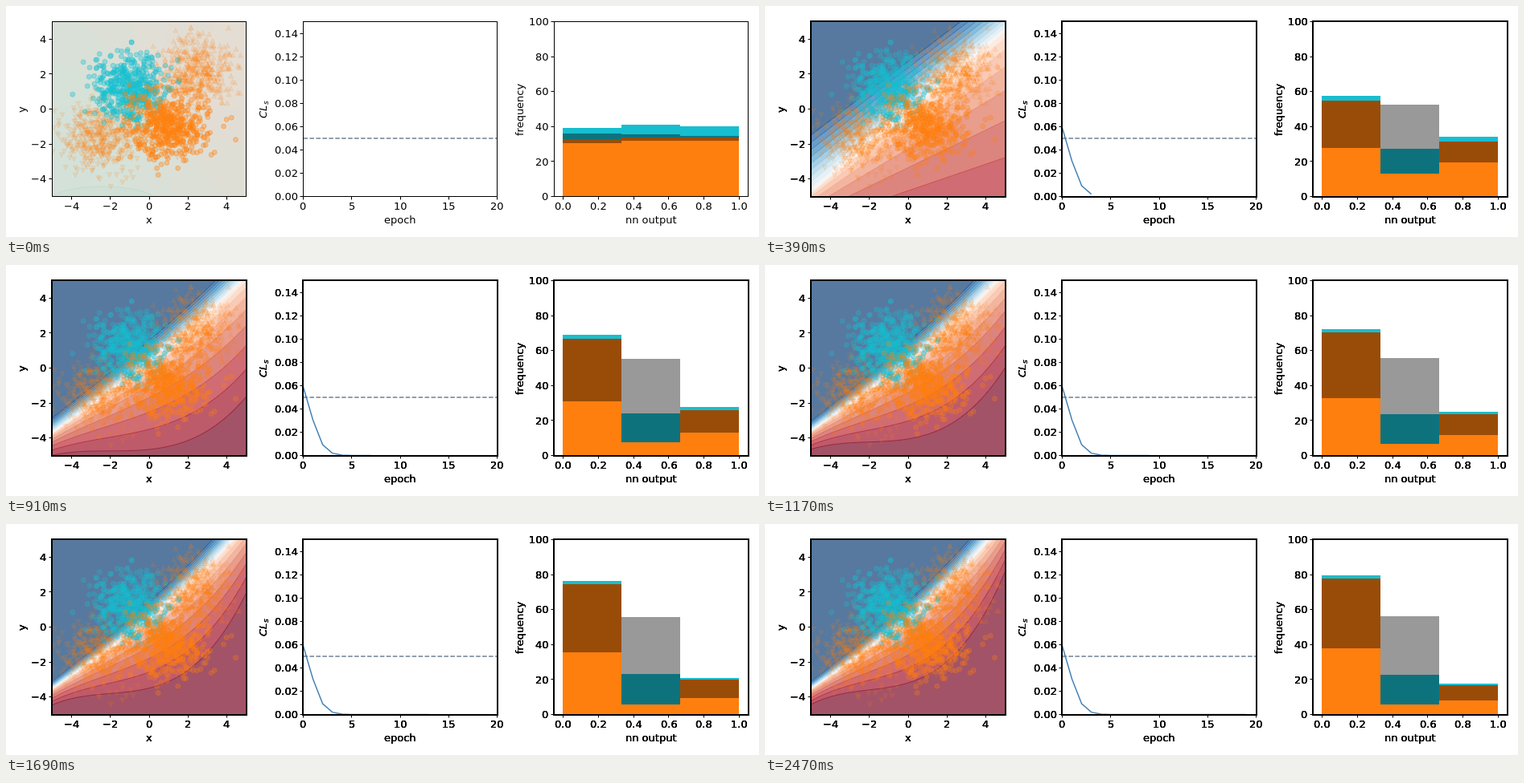
These frames come from a looping animation (936 px wide and 288 px high, 2600 ms). An HTML page with a canvas:

```html
<!DOCTYPE html>
<html lang="en">
<head>
<meta charset="utf-8">
<title>Classifier training</title>
<style>
html, body { margin: 0; width: 936px; height: 288px; overflow: hidden; background: #fff; }
canvas { display: block; }
</style>
</head>
<body>
<canvas id="stage" width="936" height="288"></canvas>
<script>
const ctx = document.getElementById('stage').getContext('2d');
const STEP = 130, EPOCHS = 20;
const TOP = 19.5, BOTTOM = 237.5, HEIGHT = 218, WIDTH = 241;
const ORANGE = '#ff7f0e', CYAN = '#17becf';
const FONT = '"DejaVu Sans", Verdana, sans-serif';

const range = (from, to, step) =>
  Array.from({ length: Math.round((to - from) / step) + 1 }, (_, i) => from + i * step);

const panels = [
  { left: 57.5, x: [-5, 5], y: [-5, 5], xt: range(-4, 4, 2), yt: range(-4, 4, 2),
    dx: 0, dy: 0, xl: 'x', yl: 'y', yx: 24 },
  { left: 369.5, x: [0, 20], y: [0, 0.15], xt: range(0, 20, 5), yt: range(0, 0.14, 0.02),
    dx: 0, dy: 2, xl: 'epoch', yl: '', yx: 324 },
  { left: 681.5, x: [-0.05, 1.05], y: [0, 100], xt: range(0, 1, 0.2), yt: range(0, 100, 20),
    dx: 1, dy: 0, xl: 'nn output', yl: 'frequency', yx: 643 }
];
const px = (p, v) => p.left + (v - p.x[0]) / (p.x[1] - p.x[0]) * WIDTH;
const py = (p, v) => BOTTOM - (v - p.y[0]) / (p.y[1] - p.y[0]) * HEIGHT;
const snap = v => Math.floor(v) + 0.5;
const mix = (a, b, t) => a.map((v, i) => v + (b[i] - v) * t);

// value moving from one level to another as training goes on
const decay = (k, from, to, tau, power = 0.85) =>
  to + (from - to) * Math.exp(-Math.pow(k / tau, power));

const stops = ['053061', '2166ac', '4393c3', '92c5de', 'd1e5f0', 'f7f7f7',
  'fddbc7', 'f4a582', 'd6604d', 'b2182b', '67001f']
  .map(h => [0, 2, 4].map(i => parseInt(h.substr(i, 2), 16)));
function cmap(v) {
  const i = Math.min(9, Math.floor(v * 10));
  return mix(stops[i], stops[i + 1], v * 10 - i);
}
const LEVELS = 20;
const fills = range(0, LEVELS - 1, 1).map(i => mix([255, 255, 255], cmap((i + 0.5) / LEVELS), 0.69));
const inks = range(0, LEVELS, 1).map(i => cmap(i / LEVELS));

// decision boundary height at t across the panel, with the widths of both slopes
function boundary(t, k) {
  const fast = Math.exp((3 - k) / 2.2), slow = Math.exp((3 - k) / 6);
  return {
    mid: 184 + 26 * fast - (165 + 35 * fast) * t - 47 * (1 - slow) * t ** 3,
    up: 10 + 25 * t + (70 - 45 * t) * fast,
    down: 25 + 65 * fast + (40 + 220 * slow) * t + 430 * (1 - slow) * t * t * (1 - t)
  };
}

function drawField(k) {
  const w = 240, h = 217, img = ctx.createImageData(w, h);
  const cols = range(0, w, 1).map(i => boundary(i / w, k));
  const value = (i, j) => {
    const { mid, up, down } = cols[i], d = j - mid;
    const v = d < 0 ? -Math.pow(Math.min(1, -d / up), 0.85) : Math.pow(Math.min(1, d / down), 0.45);
    return (0.5 + 0.5 * v) * LEVELS;
  };
  for (let j = 0, o = 0; j < h; j++) {
    for (let i = 0; i < w; i++, o += 4) {
      const v = value(i, j), near = Math.round(v);
      const slope = Math.hypot(value(i + 1, j) - v, value(i, j + 1) - v);
      let ink = 0;
      if (slope > 1e-4 && near > 0 && near < LEVELS) {
        ink = 0.62 * Math.max(0, 1 - Math.abs(v - near) / slope) * Math.min(1, 0.6 / slope);
      }
      const color = mix(fills[Math.min(LEVELS - 1, Math.floor(v))], inks[near], ink);
      img.data.set([...color, 255], o);
    }
  }
  ctx.putImageData(img, 58, 20);
}

// pale wedges fanning out from the centre
function drawUntrained() {
  const n = 14, rgb = c => `rgb(${c.map(Math.round)})`;
  for (let i = 0; i < n; i++) {
    const a = (i / n) * 2 * Math.PI, b = ((i + 1) / n) * 2 * Math.PI;
    const warm = 0.5 + 0.5 * Math.cos(a + 0.7);
    const color = mix([212, 225, 217], [228, 221, 211], warm);
    ctx.beginPath();
    ctx.moveTo(180, 125);
    ctx.lineTo(180 + 300 * Math.cos(a), 125 + 300 * Math.sin(a));
    ctx.lineTo(180 + 300 * Math.cos(b), 125 + 300 * Math.sin(b));
    ctx.closePath();
    ctx.fillStyle = ctx.strokeStyle = rgb(color);
    ctx.lineWidth = 1;
    ctx.fill();
    ctx.stroke();
  }
  ctx.beginPath();
  ctx.ellipse(120, 246, 70, 21, 0, 0, 2 * Math.PI);
  ctx.fillStyle = '#d1e0d6';
  ctx.strokeStyle = '#c3dace';
  ctx.fill();
  ctx.stroke();
}

let seed = 20;
function rnd() {
  seed = (seed * 1664525 + 1013904223) % 4294967296;
  return (seed + 1) / 4294967297;
}
function cluster(mx, my, spread) {
  return range(1, 500, 1).map(() => {
    const r = spread * Math.sqrt(-2 * Math.log(rnd())), a = 2 * Math.PI * rnd();
    return [px(panels[0], mx + r * Math.cos(a)), py(panels[0], my + r * Math.sin(a))];
  });
}
const clouds = [
  { pts: cluster(2.5, 2.1, 1), color: ORANGE, tri: 1 },
  { pts: cluster(-2.5, -1.5, 1), color: ORANGE, tri: -1 },
  { pts: cluster(-1, 1.25, 0.96), color: CYAN, tri: 0 },
  { pts: cluster(1.05, -1, 0.98), color: ORANGE, tri: 0 }
];

function drawPoints(k) {
  ctx.lineWidth = 1;
  for (const { pts, color, tri } of clouds) {
    ctx.fillStyle = ctx.strokeStyle = color;
    ctx.globalAlpha = tri ? 0.12 : k ? 0.27 : 0.36;
    for (const [x, y] of pts) {
      ctx.beginPath();
      if (tri) {
        ctx.moveTo(x, y - 3 * tri);
        ctx.lineTo(x + 3, y + 3 * tri);
        ctx.lineTo(x - 3, y + 3 * tri);
        ctx.closePath();
      } else {
        ctx.arc(x, y, 3, 0, 2 * Math.PI);
      }
      ctx.fill();
      ctx.stroke();
    }
  }
  ctx.globalAlpha = 1;
}

function drawCurve(k) {
  const p = panels[1];
  ctx.lineWidth = 1.5;
  ctx.strokeStyle = '#708090';
  ctx.setLineDash([5.55, 2.4]);
  ctx.beginPath();
  ctx.moveTo(p.left, 165);
  ctx.lineTo(p.left + WIDTH, 165);
  ctx.stroke();
  ctx.setLineDash([]);
  if (!k) return;
  ctx.strokeStyle = '#4682b4';
  ctx.beginPath();
  for (let i = 0; i <= k; i++) ctx.lineTo(px(p, i), py(p, 0.0588 * Math.exp(-0.656 * i ** 1.5)));
  ctx.stroke();
}

// background, stacked total and uncertainty band of each bin
function bins(k) {
  const b1 = decay(k, 33, 80, 5.28);
  const b2 = decay(k, 33.8, 5.5, 2.15);
  const t3 = decay(k, 40, 14.5, 10, 1.15), b3 = t3 - decay(k, 6.5, 1, 3);
  const first = decay(k, 1, 0, 0.4);
  return [
    { base: b1, total: b1 + decay(k, 6, 1.8, 2), lo: b1 - decay(k, 2.5, 40, 2.78), hi: b1 + 3 * first },
    { base: b2, total: decay(k, 41, 22.9, 2), lo: b2 - 1.8 * first, hi: decay(k, 35.5, 56, 1.5) },
    { base: b3, total: t3, lo: decay(k, 32, 7.3, 4.6), hi: b3 + first }
  ];
}

function drawBars(k) {
  const p = panels[2];
  const edge = i => Math.round(px(p, i / 3) - 0.1);
  bins(k).forEach(({ base, total, lo, hi }, i) => {
    const bar = (color, from, to) => {
      const y = Math.round(py(p, to));
      ctx.fillStyle = color;
      ctx.fillRect(edge(i), y, edge(i + 1) - edge(i), Math.round(py(p, from)) - y);
    };
    bar(ORANGE, 0, base);
    bar(CYAN, base, total);
    bar('rgba(0,0,0,0.4)', lo, hi);
  });
}

function label(s, x, y, align, passes) {
  ctx.font = '13px ' + FONT;
  const w = ctx.measureText(s).width;
  const left = Math.round(x - (align === 'right' ? w : w / 2));
  for (let i = 0; i < passes; i++) ctx.fillText(s, left, y);
}

function mathLabel(passes) {
  for (let i = 0; i < passes; i++) {
    ctx.font = 'italic 13px ' + FONT;
    ctx.fillText('CL', -11, 0);
    ctx.font = 'italic 9.1px ' + FONT;
    ctx.fillText('s', 6, 2);
  }
}

const number = (v, d) => v.toFixed(d).replace('-', '\u2212');

// after the first epoch the axes are overprinted, which thickens lines and text
function drawAxes(p, k) {
  const passes = k ? 4 : 1, grow = k ? 1 : 0;
  ctx.fillStyle = ctx.strokeStyle = '#000';
  ctx.lineWidth = 1 + grow;
  ctx.strokeRect(p.left - grow / 2, TOP - grow / 2, WIDTH + grow, HEIGHT + grow);
  ctx.lineWidth = 1;
  ctx.beginPath();
  for (const v of p.xt) {
    const x = snap(px(p, v));
    ctx.moveTo(x, 238);
    ctx.lineTo(x, 241.5);
    label(number(v, p.dx), px(p, v), 254, 'center', passes);
  }
  for (const v of p.yt) {
    const y = snap(py(p, v));
    ctx.moveTo(p.left - 0.5, y);
    ctx.lineTo(p.left - 4, y);
    label(number(v, p.dy), p.left - 7, Math.round(py(p, v) + 4.6), 'right', passes);
  }
  ctx.stroke();
  label(p.xl, p.left + WIDTH / 2, 271, 'center', passes);
  ctx.save();
  ctx.translate(p.yx, 129);
  ctx.rotate(-Math.PI / 2);
  if (p.yl) label(p.yl, 0, 0, 'center', passes);
  else mathLabel(passes);
  ctx.restore();
}

function clipTo(p, draw) {
  ctx.save();
  ctx.beginPath();
  ctx.rect(p.left, TOP, WIDTH, HEIGHT);
  ctx.clip();
  draw();
  ctx.restore();
}

function render(k) {
  ctx.fillStyle = '#fff';
  ctx.fillRect(0, 0, 936, 288);
  clipTo(panels[0], () => {
    if (k) drawField(k);
    else drawUntrained();
    drawPoints(k);
  });
  clipTo(panels[1], () => drawCurve(k));
  clipTo(panels[2], () => drawBars(k));
  panels.forEach(p => drawAxes(p, k));
}

let shown = -1;
const start = performance.now();
function tick() {
  const k = Math.floor((performance.now() - start) / STEP) % EPOCHS;
  if (k !== shown) render(shown = k);
  requestAnimationFrame(tick);
}
tick();
</script>
</body>
</html>
```
